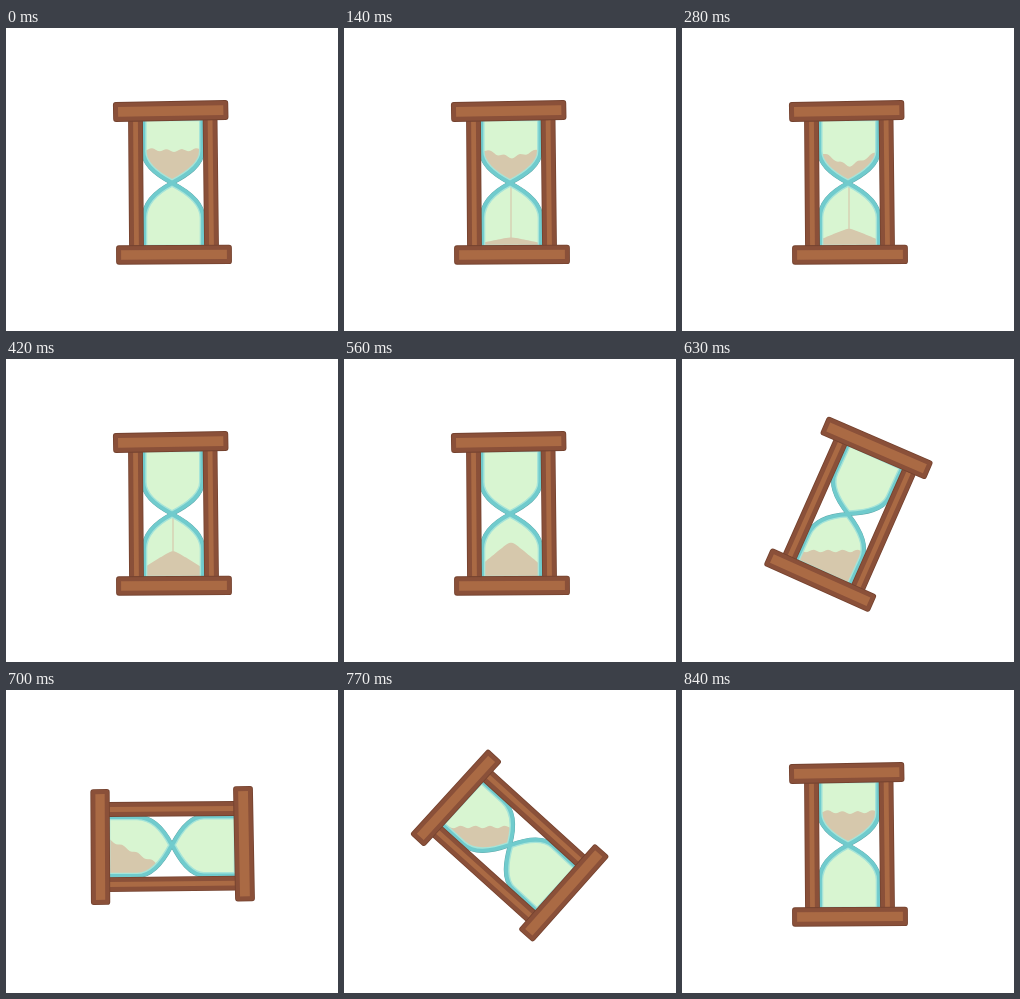
Write an HTML page with a canvas that moves like this. It is 332 px wide and 303 px high and loops after 0.91 s.

```html
<!DOCTYPE html>
<html lang="en">
<head>
<meta charset="utf-8">
<title>Hourglass</title>
<style>
html, body { margin: 0; width: 100%; height: 100%; overflow: hidden; background: #fff; }
canvas { display: block; }
</style>
</head>
<body>
<canvas id="stage" width="332" height="303"></canvas>
<script>
const ctx = document.getElementById('stage').getContext('2d');
const STEP = 70, STEPS = 13, FALL_STEPS = 8;
const CX = 166, CY = 155;
const SAND = '#d6c8ac';

const topBulb = new Path2D('M137.3 90 V123 C137.3 137 151 147 166 154.7 C181 147 196.3 137 196.3 123 V90 Z');
const bottomBulb = new Path2D('M138 220 V190 C138 174 151 163 166 155.3 C181 163 197 174 197 190 V220 Z');
const bulbs = [topBulb, bottomBulb];

// While turning, the sand surface is a line in stage space
const turns = [
  { angle: 24.4, bulb: bottomBulb, level: 192, slope: 0 },
  { angle: 90, bulb: bottomBulb, level: 181, slope: 0.5 },
  { angle: 132.7, bulb: bottomBulb, level: 137, slope: 0 }
];

const ripple = x => 1.3 * Math.sin((x - 149.7) * 2 * Math.PI / 14.7);
const peak = x => 1 - Math.hypot(x - 167, 3) / 30;

function rotate(degrees, x = CX, y = CY) {
  ctx.translate(x, y);
  ctx.rotate(degrees * Math.PI / 180);
  ctx.translate(-x, -y);
}

function stroke(path, color, width) {
  ctx.strokeStyle = color;
  ctx.lineWidth = width;
  ctx.stroke(path);
}

function drawBar(x, y, width, height, lean) {
  const bar = new Path2D();
  bar.rect(x - width / 2, y - height / 2, width, height);
  ctx.save();
  rotate(lean, x, y);
  stroke(bar, '#74422f', 5.8);
  ctx.fillStyle = '#aa6a44';
  ctx.fill(bar);
  stroke(bar, '#8a5039', 4.2);
  ctx.restore();
}

function fillSand(bulb, angle, surface) {
  ctx.save();
  ctx.clip(bulb);
  rotate(-angle);
  ctx.beginPath();
  ctx.moveTo(90, 303);
  for (let x = 90; x <= 210; x += 2) ctx.lineTo(x, surface(x));
  ctx.lineTo(210, 303);
  ctx.fillStyle = SAND;
  ctx.fill();
  ctx.restore();
}

function drawFallingSand(u) {
  const base = 121 + 35 * u ** 4;
  const dip = 2 + 28 * u;
  if (u < 1) fillSand(topBulb, 0, x => base + dip * peak(x) + ripple(x));
  if (u > 0) fillSand(bottomBulb, 0, x => 218 - u * (12 + 25 * peak(x)));
  if (u > 0 && u < 1) {
    ctx.fillStyle = SAND;
    ctx.fillRect(166.4, 154, 1.2, 60);
  }
}

function draw(step) {
  const turn = turns[step - FALL_STEPS - 1];
  ctx.clearRect(0, 0, 332, 303);
  ctx.lineJoin = 'round';
  ctx.save();
  if (turn) rotate(turn.angle);

  for (const bulb of bulbs) {
    stroke(bulb, '#5fa9ab', 4.6);
    ctx.fillStyle = '#d8f5d1';
    ctx.fill(bulb);
  }
  if (turn) {
    const { angle, bulb, level, slope } = turn;
    fillSand(bulb, angle, x => level + slope * (x - CX) + ripple(x));
  } else {
    drawFallingSand(step <= FALL_STEPS ? step / FALL_STEPS : 0);
  }
  for (const bulb of bulbs) {
    ctx.save();
    ctx.clip(bulb);
    stroke(bulb, '#a6e4d8', 6.6);
    ctx.restore();
    stroke(bulb, '#70cbcd', 3.8);
  }

  drawBar(130, 155.5, 9, 128, -0.45);
  drawBar(204.8, 155, 9, 130, -0.65);
  drawBar(164.7, 83, 109.5, 14, -1.05);
  drawBar(168, 226.7, 110, 13.5, -0.3);
  ctx.restore();
}

function tick() {
  draw(Math.floor(performance.now() / STEP) % STEPS);
  requestAnimationFrame(tick);
}
tick();
</script>
</body>
</html>
```
